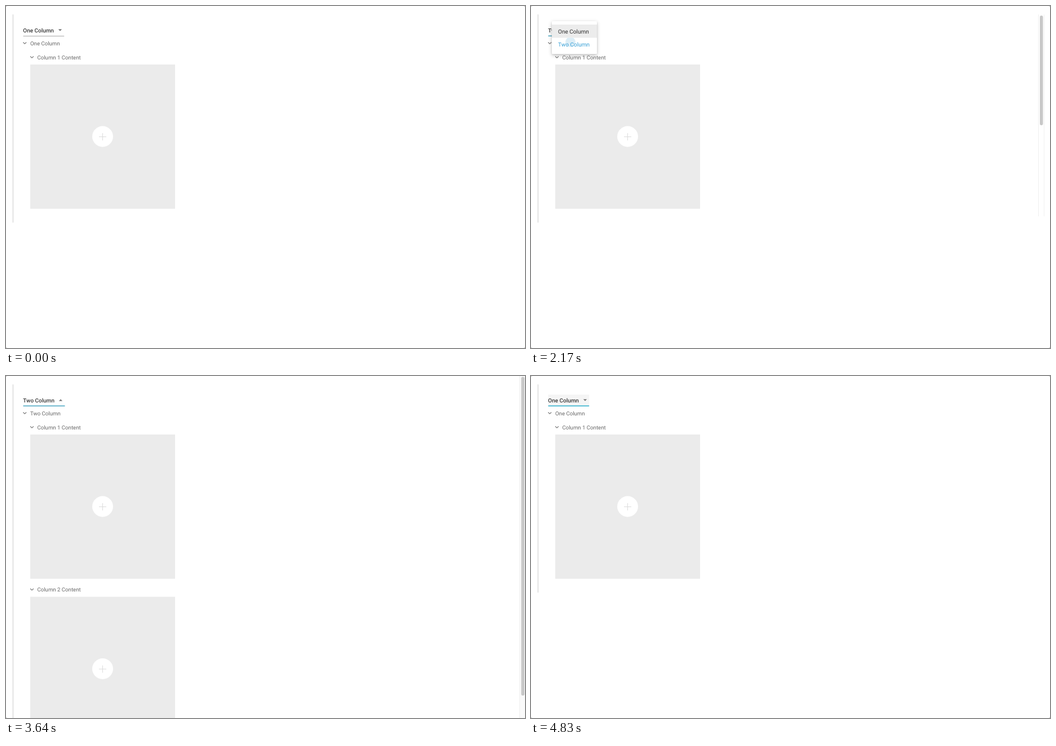
Write an HTML page that moves like this. It is 921x608 px and loops after 5.53 s.

```html
<!DOCTYPE html>
<html lang="en">
<head>
<meta charset="utf-8">
<title>Column layout picker</title>
<style>
  html, body { margin: 0; width: 100%; height: 100%; overflow: hidden; background: #fff; }
  svg { display: block; }
  text { font: 400 9.65px Roboto, sans-serif; fill: #686868; text-rendering: geometricPrecision; }
  #value { font-weight: 500; font-size: 9.95px; fill: #3a3a3a; }
  #menu text { font-size: 10.05px; }
  #menu { transform-origin: 37px 27px; }
  #sheet { filter: drop-shadow(0 1px 1px rgba(0,0,0,.1)) drop-shadow(0 2px 3px rgba(0,0,0,.24)); }
  .chevron { fill: none; stroke: #707070; stroke-width: 1.1; }
  .surface { fill: #ebebeb; }
  .thumb { fill: #c8c8c8; }
  .track { fill: #efefef; }
</style>
</head>
<body>
<svg width="921" height="608" viewBox="0 0 921 608">
  <defs>
    <path id="chevron" class="chevron" d="M-2.8 -1.5L0 1.3L2.8 -1.5"/>
    <g id="card">
      <use href="#chevron" x="46" y="91"/>
      <rect class="surface" x="43" y="104" width="257" height="256.5"/>
      <circle cx="171.5" cy="232" r="18.5" fill="#fff"/>
      <path d="M165 232h13v1h-13zM171 226h1v13h-1z" fill="#dcdcdc"/>
    </g>
    <clipPath id="rowClip"><rect id="rowClipBox" x="37" width="80" height="23.5"/></clipPath>
  </defs>

  <path d="M0 0h2L0 2zM921 0h-2l2 2zM0 608h2l-2-2zM921 608h-2l2-2z" fill="#cfcfcf"/>
  <rect id="rail" class="surface" x="11" y="15" width="3"/>

  <rect id="focus" x="30.5" y="33" height="20" fill="#f5f5f5"/>
  <text id="value" x="30.3" y="47"></text>
  <path id="arrow"/>
  <rect id="line" x="30.5"/>

  <use href="#chevron" x="33.3" y="66"/>
  <text id="heading" x="43" y="69.7"></text>

  <use href="#card"/>
  <text x="55.5" y="94.6">Column 1 Content</text>
  <g id="second" transform="translate(0 288.5)">
    <use href="#card"/>
    <text x="55.5" y="94.6">Column 2 Content</text>
  </g>

  <g id="innerScroll">
    <path class="track" d="M900 15h1v359h-1zM910 15h1v359h-1z"/>
    <rect class="thumb" x="903" y="17" width="5.5" height="195" rx="2.75"/>
  </g>
  <g id="pageScroll">
    <rect x="911" width="10" height="608" fill="#fafafa"/>
    <rect class="track" x="911" width="1" height="608"/>
    <rect class="thumb" x="914.3" y="1.5" width="5.7" height="566.5" rx="2.85"/>
  </g>

  <g id="menu">
    <rect id="sheet" x="37" y="27" width="80" height="58.5" rx="1.5" fill="#fff"/>
    <rect id="rowTint" x="37" width="80" height="23.5" fill="#ececec"/>
    <g clip-path="url(#rowClip)"><circle id="ripple"/></g>
    <text id="itemOne" x="48" y="48.5">One Column</text>
    <text id="itemTwo" x="48" y="72.1">Two Column</text>
  </g>
</svg>
<script>
const LOOP = 5530, STEP = 70;
const HOVER_AT = 420;
const BLUE = '#359fd6', DARK = '#303030';

// Two visits to the menu; every other moment follows from opening and click.
const visits = [
  { openAt: 1050, clickAt: 2100, tintY: 33, rippleX: 70, rippleY: 64, picksTwo: true },
  { openAt: 3640, clickAt: 4410, tintY: 56.5, rippleX: 71, rippleY: 38, picksTwo: false }
];

const $ = id => document.getElementById(id);
const clamp = x => Math.min(1, Math.max(0, x));
const easeOut = x => 1 - (1 - x) ** 2;
const show = (id, on) => { $(id).style.display = on ? '' : 'none'; };
const set = (id, attrs) => {
  for (const [name, value] of Object.entries(attrs)) $(id).setAttribute(name, value);
};
const columnName = two => (two ? 'Two' : 'One') + ' Column';

// The value changes one step after the click, the page layout one step later.
function stateAt(t) {
  const visit = visits.findLast(v => v.openAt <= t);
  if (!visit) return { phase: t < HOVER_AT ? 'idle' : 'hover', visit: visits[0], opened: 0, left: 0 };
  const { openAt, clickAt, picksTwo } = visit;
  const chosen = t >= clickAt + STEP;
  const applied = t >= clickAt + 2 * STEP;
  const left = 1 - clamp((t - clickAt - STEP) / (2 * STEP));
  return {
    visit, left,
    phase: !applied ? 'open' : left > 0 ? 'closing' : 'focus',
    opened: clamp((t - openAt) / (4 * STEP)),
    sinceClick: t - clickAt,
    twoChosen: chosen === picksTwo,
    twoShown: applied === picksTwo,
    settling: chosen && !applied && picksTwo
  };
}

function drawField({ phase, twoChosen }) {
  const width = twoChosen ? 74 : 72.7;
  const x = twoChosen ? 97 : 96;
  const active = phase !== 'idle' && phase !== 'hover';
  const up = phase === 'open';
  const colors = { idle: '#a8a8a8', hover: '#555', open: '#47a5c0', closing: '#3d9cc8', focus: '#2aaecb' };
  $('value').textContent = columnName(twoChosen);
  set('line', { fill: colors[phase], y: active ? 52.5 : 53, height: active ? 1.5 : 1, width });
  set('arrow', {
    d: `M${x - 3.2} ${up ? 44.5 : 41.3}h6.4l-3.2 ${up ? -3.3 : 3.3}z`,
    fill: phase === 'hover' ? '#444' : '#757575'
  });
  set('focus', { width });
  show('focus', phase === 'focus');
}

function drawMenu({ visit, opened, left, sinceClick, twoChosen }) {
  const opacity = clamp(2 * opened) * left;
  show('menu', opacity > 0);
  if (!opacity) return;
  $('menu').style.opacity = opacity;
  $('menu').style.transform = `scale(${.8 + .2 * easeOut(opened)})`;
  set('rowTint', { y: visit.tintY, opacity: opened * left });
  set('rowClipBox', { y: visit.picksTwo ? 56.5 : 33 });
  set('ripple', {
    cx: visit.rippleX,
    cy: visit.rippleY,
    r: sinceClick < 0 ? 0 : 2 + 24 * (sinceClick / (2 * STEP)) ** 1.8,
    fill: twoChosen === visit.picksTwo ? '#dcedf6' : '#e2e2e2'
  });
  $('itemOne').style.fill = twoChosen ? DARK : BLUE;
  $('itemTwo').style.fill = twoChosen ? BLUE : DARK;
}

function render(time) {
  const state = stateAt(Math.floor(time % LOOP / STEP) * STEP);
  drawField(state);
  drawMenu(state);
  $('heading').textContent = columnName(state.twoShown);
  show('second', state.twoShown);
  show('pageScroll', state.twoShown);
  show('innerScroll', state.settling);
  set('rail', { height: state.twoShown ? 593 : 370 });
}

const start = performance.now();
function tick() {
  render(performance.now() - start);
  requestAnimationFrame(tick);
}
tick();
</script>
</body>
</html>
```
